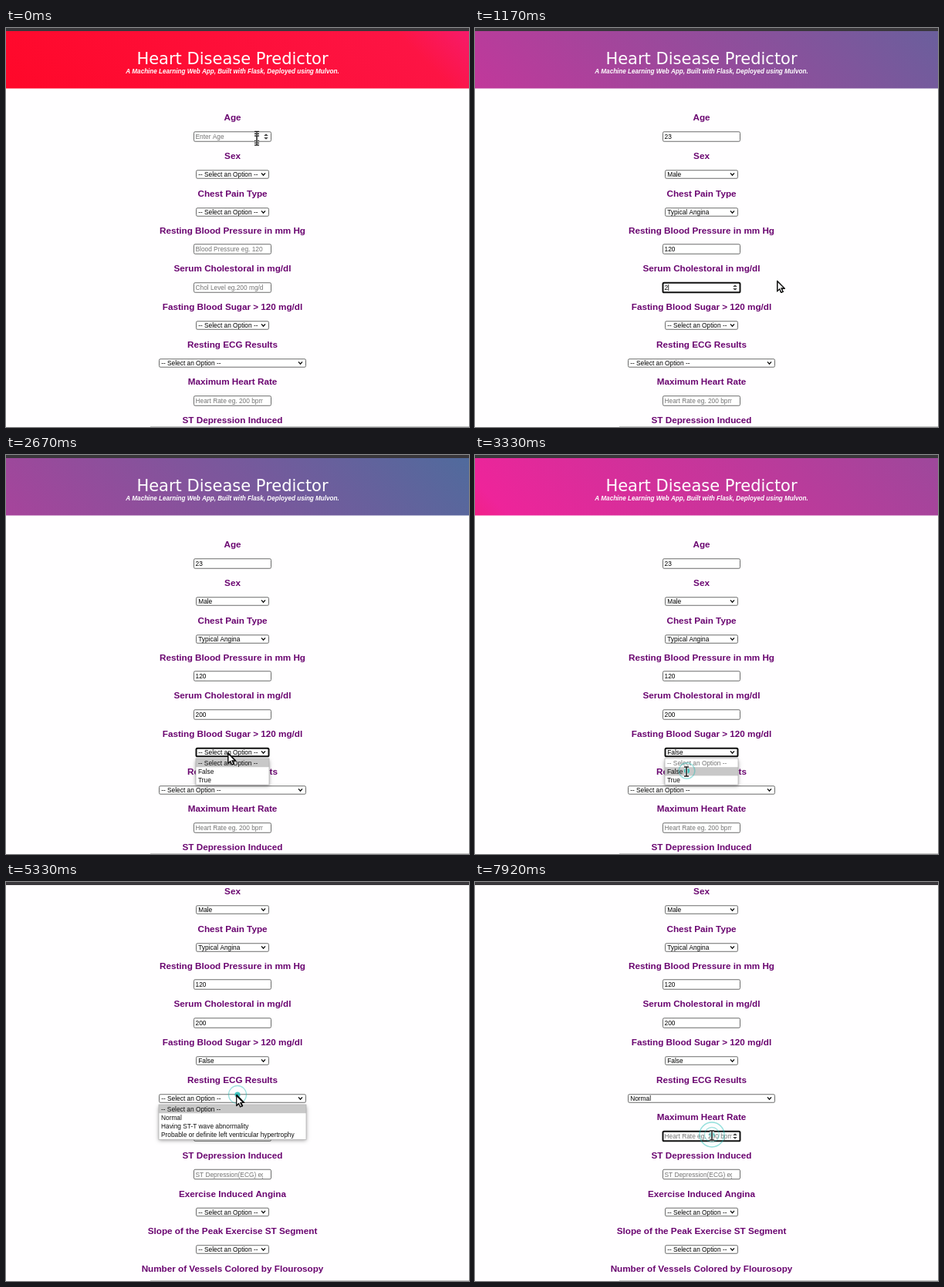
These frames come from a looping animation (600x518 px, 8 s). An HTML page with a canvas:

```html
<!DOCTYPE html>
<html lang="en">
<head>
<meta charset="utf-8">
<title>Heart Disease Predictor</title>
<style>
  html, body { margin: 0; width: 100%; height: 100%; overflow: hidden; background: #fffeff; }
  canvas { display: block; }
</style>
</head>
<body>
<canvas id="stage" width="600" height="518"></canvas>
<script>
const ctx = document.getElementById('stage').getContext('2d');
const LOOP = 8000, CENTER = 293.5;
const SANS = '"Liberation Sans", Arial, sans-serif';
const CONTROL_FONT = `8.33px ${SANS}`;
const GREY = '#757575', TEAL = '20,184,176';
const PICK = '-- Select an Option --';

// Each change is [time, value]; the latest one reached holds.
const at = (t, changes) => changes.reduce((v, [time, value]) => t >= time ? value : v, undefined);
const smooth = x => { x = Math.min(1, Math.max(0, x)); return x * x * (3 - 2 * x); };

const fields = [
  { label: 'Age', y: 116, cy: 141, hint: 'Enter Age', values: [[0, ''], [90, '2'], [160, '23']] },
  { label: 'Sex', y: 166, cy: 190, select: 1, values: [[0, PICK], [310, 'Male']] },
  { label: 'Chest Pain Type', y: 214.5, cy: 239, select: 1, values: [[0, PICK], [460, 'Typical Angina']] },
  { label: 'Resting Blood Pressure in mm Hg', y: 263, cy: 287, hint: 'Blood Pressure eg. 120',
    values: [[0, ''], [560, '12'], [620, '120']] },
  { label: 'Serum Cholestoral in mg/dl', y: 312, cy: 337, hint: 'Chol Level eg.200 mg/dl',
    values: [[0, ''], [1150, '2'], [1320, '20'], [1480, '200']] },
  { label: 'Fasting Blood Sugar > 120 mg/dl', y: 362, cy: 386, select: 1,
    values: [[0, PICK], [3290, 'False']],
    popup: { from: 2500, to: 3430, options: [PICK, 'False', 'True'], hover: [[0, 0], [2920, 1]] } },
  { label: 'Resting ECG Results', y: 410.5, cy: 435, select: 1, wide: 1,
    values: [[0, PICK], [7000, 'Normal']],
    popup: { from: 5330, to: 7080, hover: [[0, 0], [6640, 1]],
      options: [PICK, 'Normal', 'Having ST-T wave abnormality', 'Probable or definite left ventricular hypertrophy'] } },
  { label: 'Maximum Heart Rate', y: 459, cy: 484, hint: 'Heart Rate eg. 200 bpm' },
  { label: 'ST Depression Induced', y: 509, cy: 533.5, hint: 'ST Depression(ECG) eg. 1.0' },
  { label: 'Exercise Induced Angina', y: 558.5, cy: 582.5, select: 1 },
  { label: 'Slope of the Peak Exercise ST Segment', y: 607, cy: 631, select: 1 },
  { label: 'Number of Vessels Colored by Flourosopy', y: 655.5, cy: 680, select: 1 }
];

const focusChanges = [[0, -1], [80, 0], [240, 1], [390, 2], [500, 3], [640, 4],
  [2450, 5], [3500, -1], [7000, 6], [7580, 7]];

// Pointer path: time, x, y
const path = [[-150, 325, 139], [0, 325, 146], [90, 325, 148], [220, 310, 190], [300, 290, 205],
  [370, 310, 239], [450, 295, 255], [520, 320, 288], [620, 392, 329], [1500, 392, 329],
  [1700, 336, 345], [1830, 322, 338], [2150, 300, 368], [2400, 288, 386], [2700, 288, 388],
  [3100, 274, 411], [3500, 274, 411], [4080, 303, 275], [4500, 303, 275], [4850, 305, 264],
  [5150, 300, 277], [5750, 296, 279], [6030, 275, 294], [6210, 270, 290], [6330, 279, 282],
  [6700, 262, 303], [7250, 262, 303], [7540, 307, 329], [8000, 307, 329]];
const clicks = [[3275, 274.5, 410], [4110, 302, 274], [5260, 300, 276], [6940, 262, 304], [7580, 307, 328]];
const isBeam = t => t < 170 || (t >= 480 && t < 560) || (t >= 3290 && t < 3560) || t >= 7500;

function pointer(t) {
  const i = Math.max(1, path.findIndex(p => p[0] >= t));
  const [t0, x0, y0] = path[i - 1], [t1, x1, y1] = path[i];
  const k = (t - t0) / (t1 - t0);
  return [x0 + (x1 - x0) * k, y0 + (y1 - y0) * k];
}

function write(text, x, y, font, color, align = 'left') {
  ctx.font = font;
  ctx.fillStyle = color;
  ctx.textAlign = align;
  ctx.textBaseline = 'alphabetic';
  ctx.fillText(text, x, y);
}

function line(points, color, width, close) {
  ctx.beginPath();
  points.forEach(([x, y]) => ctx.lineTo(x, y));
  if (close) ctx.closePath();
  ctx.strokeStyle = color;
  ctx.lineWidth = width;
  ctx.stroke();
}

function drawHeader(t, scroll) {
  const sweep = Math.max(0, 1 - Math.abs(t - 2040) / 2040);
  const shift = 1800 * (1 - (1 - sweep) ** 1.18);
  // A 45 degree gradient over a 2400 x 300 area, seen through a sliding window
  const x = -shift - 150, y = 78 - scroll;
  const g = ctx.createLinearGradient(x, y, x + 1350, y - 1350);
  [[0, '#ff0426'], [.06, '#ff082a'], [.27, '#fd1444'], [.35, '#ee249a'], [1, '#0c899e']]
    .forEach(([stop, color]) => g.addColorStop(stop, color));
  ctx.fillStyle = g;
  ctx.fillRect(0, -scroll, 600, 78.5);
  write('Heart Disease Predictor', CENTER, 47 - scroll, '21px "DejaVu Sans", sans-serif', '#fff', 'center');
  write('A Machine Learning Web App, Built with Flask, Deployed using Mulvon.', CENTER, 58.5 - scroll,
    `italic bold 8.13px ${SANS}`, '#fff', 'center');
}

function drawSpinner(x, y) {
  for (const s of [-1, 1]) {
    ctx.beginPath();
    ctx.moveTo(x - 2.8, y + s * 1);
    ctx.lineTo(x + 2.8, y + s * 1);
    ctx.lineTo(x, y + s * 3.8);
    ctx.fillStyle = '#444';
    ctx.fill();
  }
}

function drawField(f, t, scroll, focused) {
  const y = f.cy - scroll;
  const half = f.wide ? 95 : f.select ? 47 : 50, h = f.select ? 10.5 : 12.5;
  const left = CENTER - half, right = CENTER + half;
  const value = f.values ? at(t, f.values) : f.select ? PICK : '';
  write(f.label, CENTER, f.y + 4.2 - scroll, `bold 11.7px ${SANS}`, '#6a0570', 'center');

  ctx.beginPath();
  ctx.roundRect(left, y - h / 2, half * 2, h, 1.6);
  ctx.fillStyle = '#fff';
  ctx.fill();
  ctx.strokeStyle = focused ? '#101010' : '#6b6b6b';
  ctx.lineWidth = focused ? 2 : 1;
  ctx.stroke();

  ctx.save();
  ctx.beginPath();
  ctx.rect(left, y - 7, (f.select ? right : 333) - left, 14);
  ctx.clip();
  const textX = left + (f.select ? 2.7 : 2);
  write(value || f.hint, textX, y + 3, CONTROL_FONT, value ? '#000' : GREY);
  if (focused && value && !f.select) {
    const end = textX + ctx.measureText(value).width + .6;
    line([[end, y - 4], [end, y + 4]], '#000', .8);
  }
  ctx.restore();

  if (f.select) line([[right - 9.5, y - 1.6], [right - 7, y + 1.3], [right - 4.5, y - 1.6]], '#111', 1.4);
  else if (focused || (f.label === 'Age' && t < 160)) drawSpinner(337, y);
}

function drawPopup(f, t, scroll) {
  const { from, to, options, hover } = f.popup;
  if (t < from || t >= to) return;
  const half = f.wide ? 95.5 : 47.5, row = 11.2;
  const left = CENTER - half, top = f.cy + 8 - scroll, chosen = at(t, hover);
  ctx.save();
  ctx.shadowColor = 'rgba(0,0,0,.4)';
  ctx.shadowBlur = 5;
  ctx.shadowOffsetY = 2;
  ctx.fillStyle = '#fff';
  ctx.fillRect(left, top, half * 2, options.length * row + .5);
  ctx.restore();
  options.forEach((text, i) => {
    if (i === chosen) {
      ctx.fillStyle = '#c8c8c8';
      ctx.fillRect(left, top + i * row, half * 2, row);
    }
    write(text, left + 3, top + i * row + 8.7, CONTROL_FONT, i || i === chosen ? '#111' : GREY);
  });
  ctx.strokeStyle = '#b0b0b0';
  ctx.lineWidth = .7;
  ctx.strokeRect(left, top, half * 2, options.length * row + .5);
}

function ring(x, y, r, width, alpha) {
  ctx.beginPath();
  ctx.arc(x, y, r, 0, 7);
  ctx.strokeStyle = `rgba(${TEAL},${alpha})`;
  ctx.lineWidth = width;
  ctx.stroke();
}

function drawClick(t, [start, x, y]) {
  const age = (t - start) / 420;
  if (age < 0 || age > 1) return;
  const grow = smooth(age / .45), band = Math.sin(Math.PI * Math.min(1, age / .85)) ** 2;
  const fade = Math.min(1, (1 - age) * 4);
  ring(x, y, 8 + 11 * grow - 3 * smooth((age - .55) / .25), 1.4, (.35 + .25 * grow) * fade);
  if (grow > .5) {
    ring(x, y, 15, 7, band);
    ring(x, y, 9.5, 1.3, .5 * fade);
  }
  ctx.beginPath();
  ctx.arc(x, y, 3.6, 0, 7);
  ctx.fillStyle = `rgba(${TEAL},${.8 * fade})`;
  ctx.fill();
}

function drawPointer(t, x, y) {
  ctx.save();
  ctx.translate(x, y);
  if (isBeam(t)) {
    for (const [color, width] of [['rgba(255,255,255,.7)', 2.6], ['#111', 1.3]]) {
      line([[0, -6], [0, 6]], color, width);
      for (const end of [-6, 6]) line([[-3, end], [3, end]], color, width);
    }
  } else {
    line([[0, 0], [0, 12.3], [2.8, 9.7], [4.8, 14.2], [6.9, 13.3], [4.9, 8.9], [8.7, 8.9]], '#111', 1.1, true);
    ctx.fillStyle = '#fff';
    ctx.fill();
    ctx.stroke();
  }
  ctx.restore();
}

function draw(t) {
  const scroll = 154 * smooth((t - 3560) / 460);
  const focus = at(t, focusChanges);
  ctx.fillStyle = '#fffeff';
  ctx.fillRect(0, 0, 600, 518);
  drawHeader(t, scroll);
  fields.forEach((f, i) => drawField(f, t, scroll, i === focus));
  fields.forEach(f => f.popup && drawPopup(f, t, scroll));
  ctx.fillStyle = '#39373b';
  ctx.fillRect(0, 0, 600, 4);
  ctx.fillStyle = '#c4c4c4';
  ctx.fillRect(187, 517, 413, 1);
  clicks.forEach(c => drawClick(t, c));
  // A short trail follows the moving pointer
  for (const lag of [120, 60, 0]) drawPointer(t, ...pointer(t - lag));
}

const began = performance.now();
function tick() {
  draw((performance.now() - began) % LOOP);
  requestAnimationFrame(tick);
}
tick();
</script>
</body>
</html>
```
